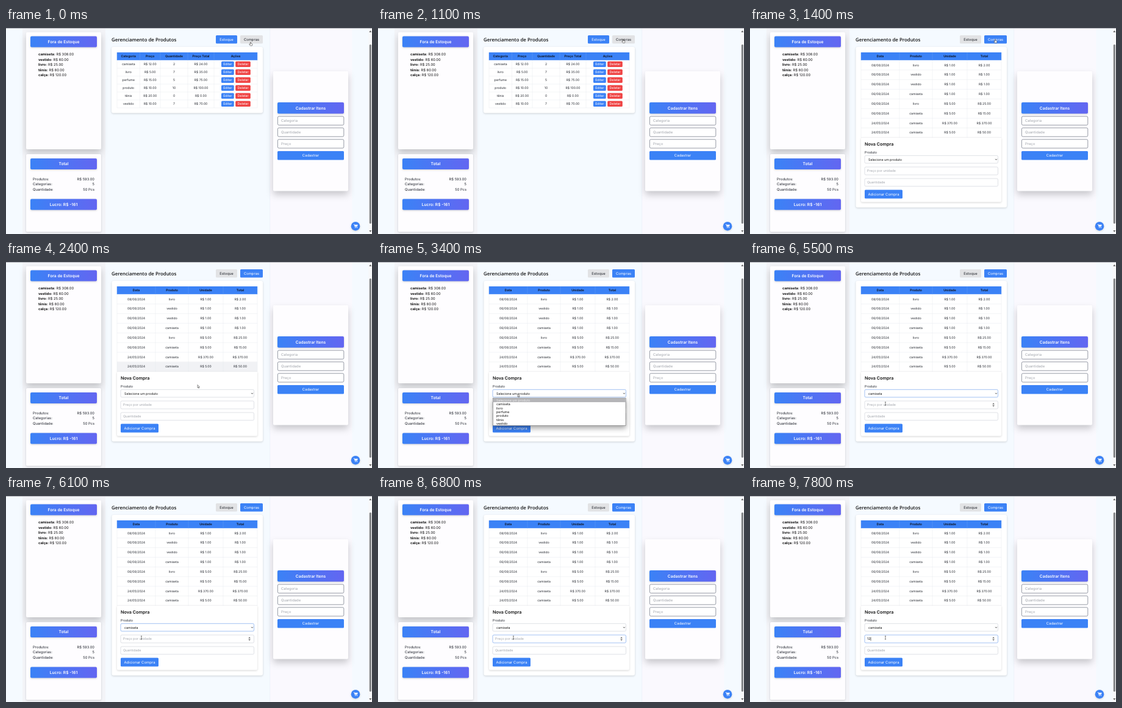
Write an HTML page that moves like this. It is 600 px wide and 338 px high and loops after 8000 ms.

```html
<!DOCTYPE html>
<html lang="pt">
<head>
<meta charset="utf-8">
<title>Gerenciamento de Produtos</title>
<style>
html, body { margin: 0; width: 100%; height: 100%; overflow: hidden; background: #f5faff; }
svg { display: block; width: 100%; height: 100%; }
text { font-family: Inter, "Open Sans", sans-serif; white-space: pre; text-rendering: geometricPrecision; }
.title { font-family: "Open Sans", "Noto Sans", sans-serif; }
.soft { filter: drop-shadow(0 1px 1.5px rgba(0,0,0,.17)); }
.deep { filter: drop-shadow(0 6px 6px rgba(0,0,0,.2)); }
.popup { filter: drop-shadow(0 4px 4px rgba(0,0,0,.36)); }
</style>
</head>
<body>
<svg id="stage" viewBox="0 0 600 338" xmlns="http://www.w3.org/2000/svg"></svg>
<script>
const BLUE = '#3b82f6', RED = '#ef4444', GREY = '#e2e3e5', INK = '#20242c', HINT = '#a0a4ab';
const LOOP = 8000;

const rect = (x, y, w, h, fill, extra = '') =>
  `<rect x="${x}" y="${y}" width="${w}" height="${h}" fill="${fill}" ${extra}/>`;
const label = (x, y, size, content, { fill = INK, anchor = 'start', weight = 400, extra = '' } = {}) =>
  `<text x="${x}" y="${y}" font-size="${size}" fill="${fill}" text-anchor="${anchor}" font-weight="${weight}" ${extra}>${content}</text>`;
const centred = (x, y, size, content, options = {}) =>
  label(x, y, size, content, { ...options, anchor: 'middle' });
const line = (x1, y1, x2, y2, stroke = '#e6e8ee') =>
  `<path d="M${x1} ${y1}L${x2} ${y2}" stroke="${stroke}" stroke-width=".5"/>`;
const group = (id, content) => `<g id="${id}">${content}</g>`;
const button = (x, y, w, h, content, size = 5.9, fill = BLUE, ink = '#fff') =>
  rect(x, y, w, h, fill, 'rx="1.5"') +
  centred(x + w / 2, y + h / 2 + size * .35, size, content, { fill: ink });
const banner = (x, y, h, content) =>
  rect(x, y, 109, h, 'url(#indigo)', 'rx="2" class="soft"') +
  centred(x + 54.5, y + h / 2 + 2.4, 6.7, content, { fill: '#fff', weight: 600 });
const field = (x, y, w, h, stroke, extra = '') =>
  rect(x, y, w, h, '#fff', `rx="2" stroke="${stroke}" stroke-width=".7" ${extra}`);

function table(edges, heads, rows, pitch) {
  const top = 53, bottom = top + rows.length * pitch;
  const middle = i => (edges[i] + edges[i + 1]) / 2;
  let out = rect(182, top, 230, bottom - top, '#fff') + rect(182, 40, 230, 12.8, BLUE);
  heads.forEach((head, i) => out += centred(middle(i), 48.3, 5.1, head, { weight: 700, fill: '#111827' }));
  rows.forEach((row, r) => {
    const y = top + r * pitch;
    if (r === 7) out += rect(182, y, 230, pitch, '#f1f2f5', 'id="hoverRow"');
    row.forEach((cell, i) => out += centred(middle(i), y + pitch / 2 + 1.6, 5.1, cell));
    out += line(182, y + pitch, 412, y + pitch);
  });
  edges.forEach(x => out += line(x, 53, x, bottom) + line(x, 40, x, 53, '#5f98f5'));
  return out;
}

function leftColumn() {
  const owed = [['camiseta', '308.00'], ['vestido', '60.00'], ['livro', '25.00'], ['tênis', '80.00'], ['calça', '120.00']];
  const totals = [['Produtos:', 'R$ 593.00'], ['Categorias:', '5'], ['Quantidade:', '50 Pcs']];
  return rect(27, 1, 136, 337, '#f3f4f8') +
    rect(33, 7, 123, 192, '#fefdff', 'rx="2" class="deep"') +
    rect(33, 207, 123, 127.5, '#fefdff', 'rx="2" class="soft"') +
    banner(40, 13.4, 18, 'Fora de Estoque') +
    owed.map(([name, price], i) => label(53, 45.3 + i * 8.4, 5.8,
      `<tspan font-weight="700">${name}:</tspan> R$ ${price}`, { fill: '#111' })).join('') +
    banner(40, 214, 18, 'Total') +
    totals.map(([name, value], i) => label(44, 249.8 + i * 8.6, 5.9, name) +
      label(145, 249.8 + i * 8.6, 5.8, value, { anchor: 'end' })).join('') +
    banner(40, 280.5, 18, 'Lucro: R$ -161');
}

function rightColumn() {
  return rect(433, 1, 134.5, 337, '#faf9fe') + line(432.7, 1, 432.7, 338, '#e9edf4') +
    rect(438, 71, 123, 196.5, '#fefdff', 'rx="2" class="deep"') +
    banner(445, 122, 18.5, 'Cadastrar Itens') +
    ['Categoria', 'Quantidade', 'Preço'].map((hint, i) =>
      field(445.4, 145 + i * 18.9, 108.4, 14.3, '#6b7280') +
      label(451, 154.2 + i * 18.9, 5.9, hint, { fill: HINT })).join('') +
    button(445, 202, 109, 14.4, 'Cadastrar');
}

function stockView() {
  const rows = [['camiseta', 12, 2, 24], ['livro', 5, 7, 35], ['perfume', 15, 5, 75],
    ['produto', 10, 10, 100], ['tênis', 20, 0, 0], ['vestido', 10, 7, 70]];
  const money = n => `R$ ${n}.00`;
  const cells = rows.map(([name, price, count, total]) => [name, money(price), count, money(total)]);
  return rect(173, 31, 248, 108.5, '#fff', 'rx="3" class="soft"') +
    table([182, 219.5, 253, 298, 341, 412], ['Categoria', 'Preço', 'Quantidade', 'Preço Total', 'Ações'], cells, 13) +
    rows.map((_, i) => button(353, 54.7 + i * 13, 20.7, 9.3, 'Editar', 5.3) +
      button(376.2, 54.7 + i * 13, 24.6, 9.3, 'Deletar', 5.3, RED)).join('');
}

function purchaseView() {
  const rows = [['08/06', 'livro', 1, 2], ['06/06', 'vestido', 1, 1], ['06/06', 'vestido', 1, 1],
    ['06/06', 'camiseta', 1, 1], ['06/06', 'livro', 5, 25], ['06/06', 'camiseta', 5, 15],
    ['24/05', 'camiseta', 370, 370], ['24/05', 'camiseta', 5, 50]];
  const cells = rows.map(([day, name, unit, total]) => [`${day}/2024`, name, `R$ ${unit}.00`, `R$ ${total}.00`]);
  return rect(173.5, 31, 247.5, 263.5, '#fff', 'rx="3" class="soft"') +
    table([182, 245, 299, 356, 412], ['Data', 'Produto', 'Unidade', 'Total'], cells, 15.85) +
    rect(182, 180, 230, 105.5, '#fff', 'rx="2" class="soft"') +
    label(188, 192.6, 7.2, 'Nova Compra', { weight: 600, fill: '#111' }) +
    label(188, 206.1, 5.4, 'Produto') +
    field(188, 209.3, 218.5, 12.6, '#d1d5db', 'id="select"') +
    label(194, 217.6, 5.3, '', { extra: 'id="choice"', fill: '#111' }) +
    '<path d="M402 214.9l1.5 1.5 1.5-1.5" fill="none" stroke="#222" stroke-width=".8"/>' +
    field(188, 228, 218.5, 13, '#d1d5db', 'id="price"') +
    label(192, 236.3, 5.4, '', { extra: 'id="priceText"' }) +
    rect(196.7, 231.5, .6, 6, '#111', 'id="caret"') +
    group('spinner', '<path d="M397.3 233.6l1.8-2 1.8 2zM397.3 235.2l1.8 2 1.8-2z" fill="#555"/>') +
    field(188, 247, 218.5, 12.7, '#d1d5db') +
    label(192, 255.2, 5.4, 'Quantidade', { fill: HINT }) +
    button(188, 265.5, 62, 14.3, 'Adicionar Compra', 6) +
    group('menu', rect(188.3, 223.3, 217.8, 45, '#fff', 'stroke="#777" stroke-width=".7" class="popup"') +
      rect(188.6, 223.6, 217.2, 6.4, '#5c5c60', 'id="marker"') +
      ['Selecione um produto', 'camiseta', 'livro', 'perfume', 'produto', 'tênis', 'vestido'].map((name, i) =>
        label(194, 228.9 + i * 6.32, 5.35, name, { extra: 'class="option"', fill: '#111' })).join(''));
}

function pageFrame() {
  return rect(0, 0, 600, .9, '#a6a8ad') + rect(594, 1, 6, 337, '#f7f8fa') +
    rect(595.7, 27, 3.3, 294, '#85878a', 'rx="1.6"') +
    '<path d="M595.3 7l2-3 2 3zM595.3 332l2 3 2-3z" fill="#666"/>' +
    `<g class="soft"><circle cx="573" cy="325.2" r="7.3" fill="${BLUE}"/></g>` +
    '<path d="M569.8 322.3h1.2l1 3.8h3.8" fill="none" stroke="#fff" stroke-width=".8"/>' +
    '<path d="M571.3 322.8h5.4l-.8 2.6h-3.9z" fill="#fff"/>' +
    '<circle cx="572.6" cy="327.6" r=".7" fill="#fff"/><circle cx="575.4" cy="327.6" r=".7" fill="#fff"/>';
}

const outlined = (id, d) => group(id, `<path d="${d}" fill="#fff" stroke="#333" stroke-width=".55" stroke-linejoin="round"/>`);
const cursor = group('cursor',
  outlined('hand', 'M-.6 .4Q0-.3 .6 .4V2.4L2.5 2.9Q3.1 3.2 2.9 4.2L2.4 6H-.6L-2.4 3.7Q-2.1 2.9-1.3 3.4L-.6 4z') +
  outlined('arrow', 'M0 0V4.9L1.1 3.9 1.9 5.6 2.7 5.2 1.9 3.6H3.4z') +
  group('beam', '<path d="M-1.1-2.6h2.2M-1.1 2.6h2.2M0-2.6V2.6" stroke="#333" stroke-width=".6"/>'));

document.getElementById('stage').innerHTML =
  `<defs><linearGradient id="indigo"><stop stop-color="${BLUE}"/><stop offset="1" stop-color="#6366f1"/></linearGradient></defs>` +
  rect(0, 0, 600, 338, '#f5faff') + leftColumn() + rightColumn() +
  label(173, 22.2, 7.85, 'Gerenciamento de Produtos', { weight: 600, fill: '#111', extra: 'class="title"' }) +
  group('stockTab', button(344, 12, 35, 13.6, 'Estoque')) +
  group('buyTab', button(384, 12, 37, 13.6, 'Compras')) +
  group('stock', stockView()) + group('purchases', purchaseView()) + pageFrame() + cursor;

const el = id => document.getElementById(id);
const show = (id, on) => el(id).setAttribute('display', on ? 'inline' : 'none');
const paint = (id, fill) => el(id).setAttribute('fill', fill);
const options = [...document.querySelectorAll('.option')];

// time, x, y of the pointer tip
const path = [[0, 401, 23], [300, 401, 23], [900, 402, 18.5], [2250, 402, 18.5], [2400, 314, 201.5],
  [2800, 236, 221], [3100, 229, 216.5], [4200, 229, 216.5], [4300, 222, 233.5], [5200, 222, 233.5],
  [5400, 222, 232.5], [LOOP, 222, 232.5]];

function pointerAt(t) {
  const i = path.findIndex(p => p[0] > t);
  const [a, b] = [path[i - 1], path[i]];
  const k = (t - a[0]) / (b[0] - a[0]);
  const ease = k * k * (3 - 2 * k);
  return [1, 2].map(n => a[n] + (b[n] - a[n]) * ease);
}

function tab(id, active) {
  const [box, text] = el(id).children;
  box.setAttribute('fill', active ? BLUE : GREY);
  text.setAttribute('fill', active ? '#fff' : INK);
}

function draw(t) {
  const buying = t >= 1400, open = t >= 3400 && t < 5200, chosen = t >= 5200, typing = t >= 6300;
  show('stock', !buying);
  show('purchases', buying);
  tab('stockTab', !buying);
  tab('buyTab', buying);

  el('hoverRow').setAttribute('opacity', t < 2300 ? 0 : Math.max(0, 1 - Math.max(0, t - 2400) / 150));
  el('select').setAttribute('stroke', t >= 3400 && !typing ? '#7ba8ee' : '#d1d5db');
  el('choice').textContent = chosen ? 'camiseta' : 'Selecione um produto';

  show('menu', open);
  const picked = t >= 4300 ? 1 : 0;
  el('marker').setAttribute('y', 223.6 + picked * 6.32);
  paint('marker', picked ? '#5c5c60' : '#b5b5b8');
  options.forEach((option, i) => option.setAttribute('fill',
    i === 0 ? (picked ? '#8b8b8b' : '#eee') : i === picked ? '#fff' : '#111'));

  const value = t < 7500 ? '' : t < 7700 ? '1' : '12';
  el('price').setAttribute('stroke', typing ? '#7ba8ee' : '#d1d5db');
  el('priceText').textContent = value || 'Preço por unidade';
  paint('priceText', value ? '#111' : HINT);
  show('spinner', chosen);
  show('caret', typing && !(t >= 6800 && t < 7200));
  el('caret').setAttribute('x', [192, 194.4, 197.7][value.length]);

  const [x, y] = pointerAt(t);
  el('cursor').setAttribute('transform', `translate(${x.toFixed(2)} ${y.toFixed(2)})`);
  show('hand', t < 2300);
  show('arrow', t >= 2300 && !chosen);
  show('beam', chosen);
}

function tick() {
  draw(performance.now() % LOOP);
  requestAnimationFrame(tick);
}
tick();
</script>
</body>
</html>
```
